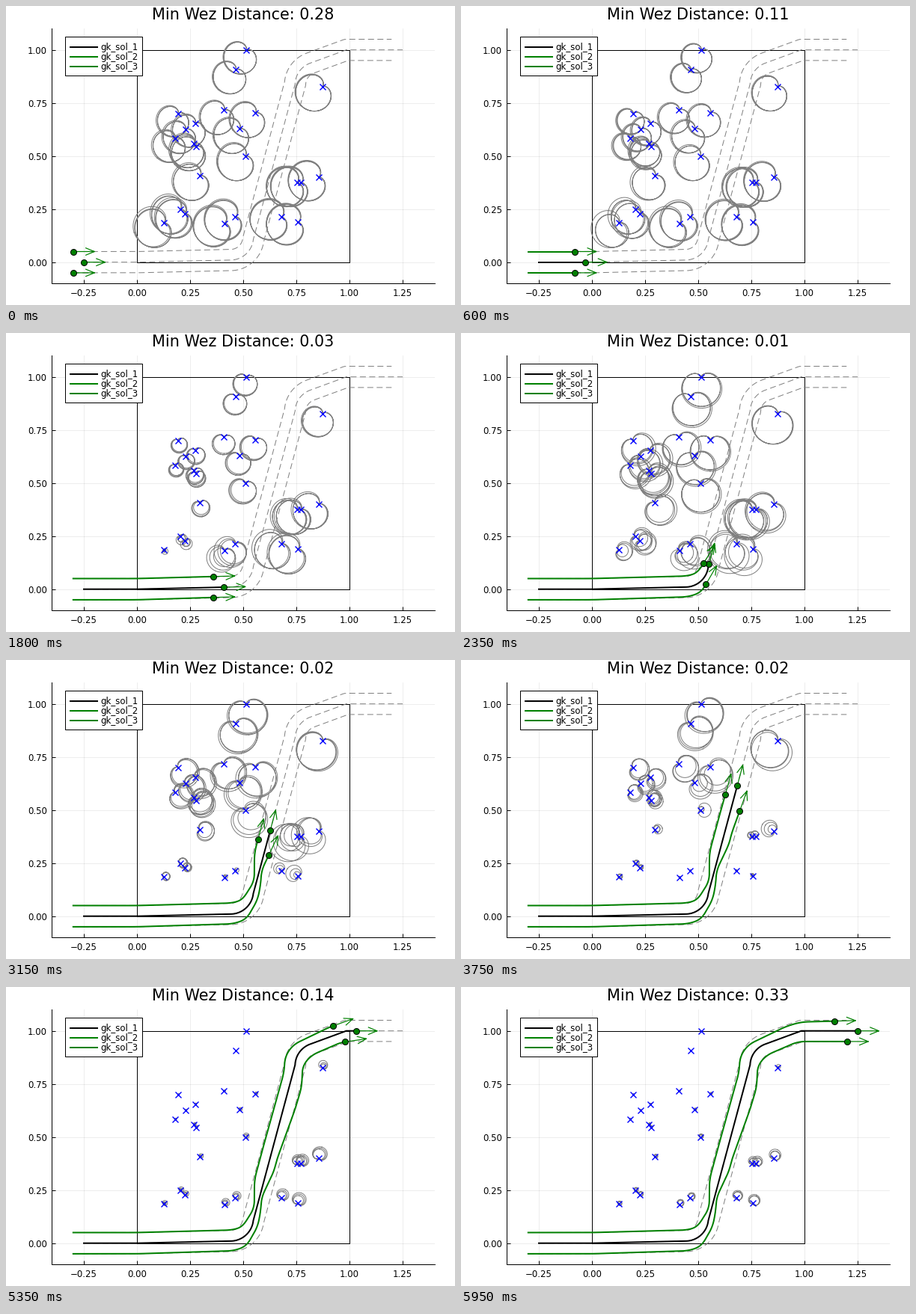
Write a matplotlib script that moves like this. It is 600 by 400 pixels and loops after 6 s.

```python
import numpy as np
import matplotlib.pyplot as plt
from matplotlib.animation import FuncAnimation
from matplotlib.patches import Rectangle

plt.rcParams["font.family"] = "DejaVu Sans"

PX = 0.72            # points per pixel at 100 dpi
FRAMES = 120
REACH = 0.15         # largest engagement range
TURN = 0.108         # leader's turning radius
GAP = 0.05           # sideways spacing of the formation
GREY, GREEN = "#808080", "#008000"
SMALL, LARGE = 11.75 * PX, 20.8 * PX

THREATS = np.array([
    (.126, .184), (.203, .248), (.225, .228), (.411, .183), (.463, .214),
    (.297, .407), (.179, .583), (.269, .560), (.277, .546), (.228, .625),
    (.274, .655), (.194, .701), (.410, .716), (.483, .628), (.558, .703),
    (.509, .500), (.465, .906), (.514, .999), (.873, .828), (.855, .401),
    (.752, .374), (.772, .374), (.679, .213), (.757, .188)])

# Corners of the two evasive routes
LEFT = [(-.3, .05), (0, .05), (.45, .062), (.497, .078), (.552, .165),
        (.553, .30), (.596, .46), (.692, .805), (.697, .88), (.735, .935),
        (.915, 1.022), (.985, 1.042), (1.14, 1.046)]
RIGHT = [(-.3, -.05), (0, -.05), (.455, -.036), (.515, -.014), (.568, .078),
         (.582, .15), (.586, .215), (.645, .34), (.657, .39), (.742, .625),
         (.775, .735), (.779, .835), (.82, .885), (.97, .95), (1.2, .95)]


def polar(angle, r=1.0):
    return np.stack([r * np.cos(angle), r * np.sin(angle)], axis=-1)


def arc(center, start, end):
    """Turn between two headings in degrees, left if they increase."""
    h = np.radians(np.linspace(start, end, 40))
    return center + polar(h - np.sign(end - start) * np.pi / 2, TURN)


def rounded(points, radius=0.035):
    """Polyline with each corner replaced by a quadratic arc."""
    p = np.array(points, float)
    t = np.linspace(0, 1, 12)[:, None]
    parts = [p[:1]]
    for a, b, c in zip(p, p[1:], p[2:]):
        u, v = a - b, c - b
        lu, lv = np.hypot(*u), np.hypot(*v)
        start = b + u / lu * min(radius, lu / 2)
        end = b + v / lv * min(radius, lv / 2)
        parts.append((1 - t)**2 * start + 2 * t * (1 - t) * b + t**2 * end)
    return np.vstack(parts + [p[-1:]])


class Agent:
    """Moves along a route, giving up any lag in the first bend."""

    def __init__(self, route, speed=None):
        self.xy = route
        self.s = np.r_[0, np.cumsum(np.hypot(*np.diff(route, axis=0).T))]
        self.speed = speed or self.s[-1] / (FRAMES - 1)
        self.lag = self.speed * (FRAMES - 1) - self.s[-1]

    def travel(self, i):
        u = np.clip((i - 40) / 24, 0, 1)
        return self.speed * i - self.lag * u * u * (3 - 2 * u)

    def at(self, s):
        return np.stack([np.interp(s, self.s, self.xy[:, 0]),
                         np.interp(s, self.s, self.xy[:, 1])], axis=-1)

    def heading(self, s):
        d = (self.at(np.minimum(s + .008, self.s[-1]))
             - self.at(np.maximum(s - .008, 0)))
        return np.arctan2(d[..., 1], d[..., 0])

    def pose(self, i):
        s = self.travel(i)
        return self.at(s), self.heading(s)

    def trail(self, i):
        s = self.travel(i)
        return np.vstack([self.xy[self.s < s], self.at(s)])

    def beside(self, side):
        """Planned route of a wingman, parallel to this one."""
        s = np.linspace(0, self.s[-1], 800)
        xy = self.at(s) + side * GAP * polar(self.heading(s) + np.pi / 2)
        return np.vstack([(-.3, side * GAP), xy[xy[:, 0] <= 1.2]])


def joined(curves):
    """Stack curves into one array with gaps between them."""
    gap = np.full((1, 2), np.nan)
    return np.vstack([part for c in curves for part in (c, gap)])


PHI = np.linspace(0, 2 * np.pi, 73)


def zones(pos, heading):
    """Cardioids facing the agent, and its smallest clearance."""
    d = THREATS - pos
    sight = np.arctan2(d[:, 1], d[:, 0])
    reach = REACH * (1 + np.cos(sight - heading)) / 2
    clearance = (np.hypot(*d.T) - reach).min()
    curves = [c + polar(PHI + a, r * (1 + np.cos(PHI)) / 2)
              for c, r, a in zip(THREATS, reach, sight + np.pi)]
    return curves, clearance


def arrow(pos, heading, length=0.1, head=0.044, spread=0.39):
    tip = pos + polar(heading, length)
    wings = [tip - polar(heading + k * spread, head) for k in (-1, 1)]
    return [np.array([pos, tip]), np.array([wings[0], tip, wings[1]])]


leader = Agent(np.vstack([
    (-.25, 0), (0, 0),
    arc((.44, .118), 1.5, 84),
    arc((.852, .836), 88, 20),
    (.985, 1), (1.25, 1)]))
agents = [leader] + [Agent(rounded(p), leader.speed) for p in (LEFT, RIGHT)]

fig = plt.figure(figsize=(6, 4), dpi=100, facecolor="white")
ax = fig.add_axes([61.4 / 600, 28.9 / 400, 511.2 / 600, 340.8 / 400])
ax.set(xlim=(-.4, 1.4), ylim=(-.1, 1.1))
ax.spines[["top", "right"]].set_visible(False)
ax.spines[["left", "bottom"]].set_linewidth(PX)
xt, yt = np.arange(-1, 6) / 4, np.arange(5) / 4
ax.set_xticks(xt, [f"{v:.2f}".replace("-", "\u2212") for v in xt])
ax.set_yticks(yt, [f"{v:.2f}" for v in yt])
ax.tick_params(direction="in", length=5 * PX, width=PX, pad=4.7,
               labelsize=SMALL)
ax.grid(color="black", alpha=0.1, lw=0.5)
ax.set_axisbelow(True)

ax.add_patch(Rectangle((0, 0), 1, 1, fill=False, ec="black", lw=PX))
for plan in (leader.beside(1), leader.xy, leader.beside(-1)):
    ax.plot(*plan.T, color=GREY, lw=PX, ls=(0, (8, 4.5)), zorder=2)
ax.plot(*THREATS.T, "x", color="blue", ms=8 * PX, mew=1.4 * PX, zorder=5)

trails = [ax.plot([], [], color=c, lw=2 * PX, zorder=4)[0]
          for c in ("black", GREEN, GREEN)]
rings, = ax.plot([], [], color=GREY, lw=PX, zorder=3)
arrows, = ax.plot([], [], color=GREEN, lw=1.2 * PX, zorder=6,
                  solid_joinstyle="miter")
dots, = ax.plot([], [], "o", color=GREEN, mec="black", mew=PX, ms=8 * PX,
                zorder=7)
title = fig.text(317 / 600, 1 - 18 / 400, "", ha="center", fontsize=LARGE)

# Legend in pixel coordinates
key = fig.add_axes([0, 0, 1, 1], xlim=(0, 600), ylim=(400, 0))
key.axis("off")
key.add_patch(Rectangle((79.4, 41.4), 103, 52, fc="white", ec="black", lw=PX))
for n, c in enumerate(("black", GREEN, GREEN)):
    y = 55 + 13 * n
    key.plot([86, 122], [y, y], color=c, lw=2 * PX)
    key.text(126.6, y + 4, f"gk_sol_{n + 1}", fontsize=SMALL)


def draw(i):
    poses = [a.pose(i) for a in agents]
    curves, gaps = zip(*(zones(*p) for p in poses))
    rings.set_data(*joined(sum(curves, [])).T)
    arrows.set_data(*joined(sum((arrow(*p) for p in poses), [])).T)
    dots.set_data(*np.array([p for p, _ in poses]).T)
    for line, agent in zip(trails, agents):
        line.set_data(*agent.trail(i).T)
    title.set_text(f"Min Wez Distance: {round(max(float(min(gaps)), 0.0), 2)}")
    return [rings, arrows, dots, title, *trails]


anim = FuncAnimation(fig, draw, frames=FRAMES, interval=50, repeat=True,
                     repeat_delay=0, blit=False)
plt.show()
```
